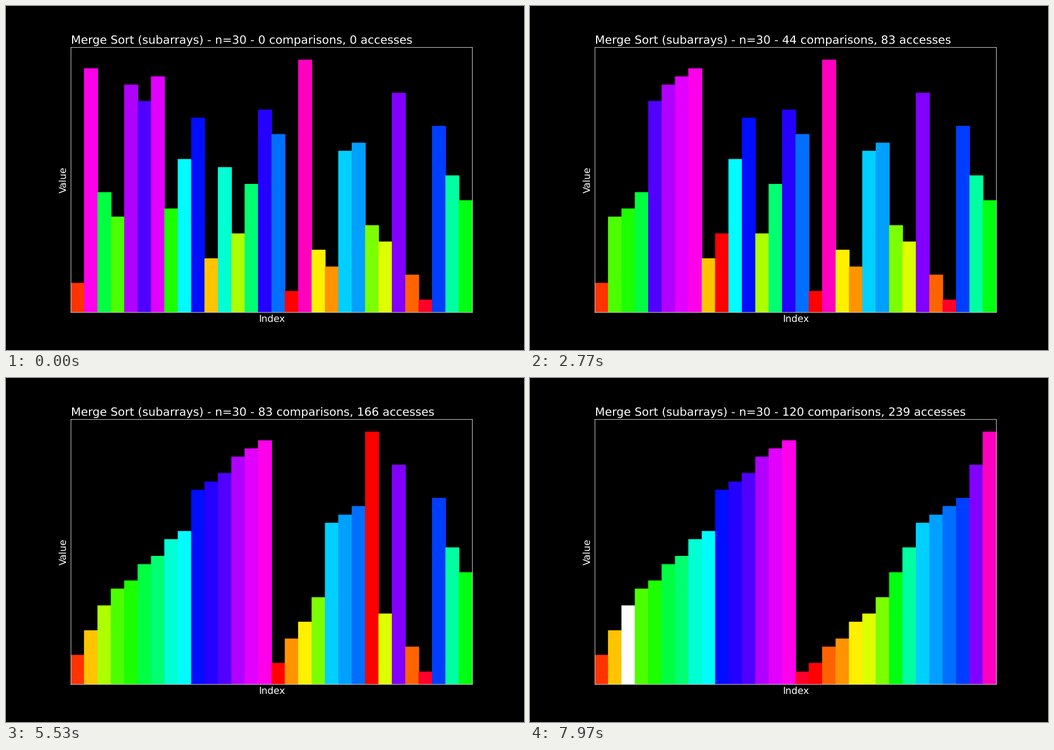
Animation of 917x611 px, one loop 8 s. Source, as a matplotlib script:

```python
import numpy as np
import matplotlib.pyplot as plt
from matplotlib.animation import FuncAnimation

W, H, DPI = 917, 611, 64
SHEET_W, SHEET_H = 1200, 800         # layout units, 100 per inch
PT = 100 * W / SHEET_W / DPI         # one sheet point in figure points
N = 30
TICK = 20                            # ms per drawn frame
FRAMES = 8000 // TICK

plt.rcParams.update({
    "font.family": "DejaVu Sans",
    "font.size": 16 * PT,
    "text.hinting": "no_hinting",
    "axes.linewidth": 0.8 * PT,
    "axes.titlepad": 6 * PT,
    "axes.labelpad": 4 * PT,
    "patch.linewidth": 1.0 * PT,
    "text.color": "white",
    "axes.labelcolor": "white",
    "axes.edgecolor": "white",
    "axes.facecolor": "black",
    "figure.facecolor": "black",
})

START = [2, 28, 13, 10, 26, 24, 27, 11, 17, 22, 5, 16, 8, 14, 23,
         20, 1, 29, 6, 4, 18, 19, 9, 7, 25, 3, 0, 21, 15, 12]


class Recorder:
    """Merge sort that keeps a snapshot for every array access."""

    def __init__(self, ranks):
        self.ranks = list(ranks)
        self.compared = 0
        self.steps = []
        self.log(None, None)
        self.sort(0, len(ranks) - 1)

    def log(self, index, color):
        self.steps.append((list(self.ranks), index, color, self.compared))

    def sort(self, lo, hi):
        if lo >= hi:
            return
        mid = (lo + hi) // 2
        self.sort(lo, mid)
        self.sort(mid + 1, hi)
        self.merge(lo, hi)

    def merge(self, lo, hi):
        for i in range(lo, hi + 1):
            self.log(i, "white")
            self.compared += 1
        merged = sorted(self.ranks[lo:hi + 1])
        for i, rank in enumerate(merged, lo):
            self.ranks[i] = rank
            self.log(i, "red")


def step_at(frame):
    """30 accesses a second, each starting on the nearest 10 ms."""
    centis = (frame + 0.5) * TICK / 10
    return int((centis + 0.5) * 0.3)


# Edges run through the middle of sheet pixels.
LEFT, RIGHT, BOTTOM, TOP = 150.5, 1080.5, 87.5, 703.5

steps = Recorder(START).steps
heights = np.round(np.linspace(0.05, 1.0, N) * (TOP - BOTTOM) / 1.05)
colors = plt.get_cmap("gist_rainbow")(np.linspace(0, 1, N))

fig, ax = plt.subplots(figsize=(W / DPI, H / DPI), dpi=DPI)
fig.subplots_adjust(left=LEFT / SHEET_W, right=RIGHT / SHEET_W,
                    bottom=BOTTOM / SHEET_H, top=TOP / SHEET_H)
bars = ax.bar(np.arange(N), heights[START], width=1, align="edge")
ax.set(xlim=(0, N), ylim=(0, TOP - BOTTOM), xticks=[], yticks=[],
       xlabel="Index", ylabel="Value")
title = ax.set_title("", loc="left", fontsize=19.2 * PT)
for shape in [*bars, *ax.spines.values()]:
    shape.set_snap(False)


def update(frame):
    step = step_at(frame)
    ranks, active, mark, compared = steps[step]
    title.set_text(f"Merge Sort (subarrays) - n={N} - "
                   f"{compared} comparisons, {step} accesses")
    for i, (bar, rank) in enumerate(zip(bars, ranks)):
        bar.set_height(heights[rank])
        bar.set_color(mark if i == active else colors[rank])
    return [title, *bars]


anim = FuncAnimation(fig, update, frames=FRAMES, interval=TICK,
                     init_func=lambda: update(0), repeat=True,
                     repeat_delay=0, blit=False)
plt.show()
```
